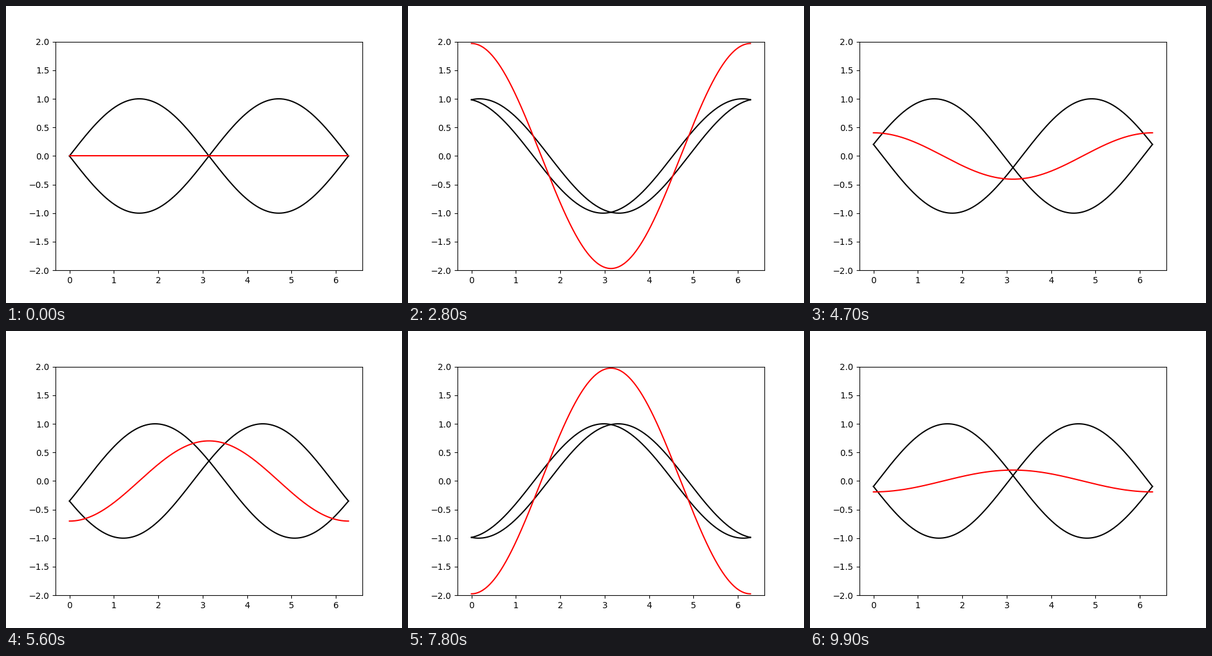
Recreate the animation shown at these times as a matplotlib script. Size 640 by 480 pixels, loop 10 s.

```python
import numpy as np
import matplotlib.pyplot as plt
from matplotlib.animation import FuncAnimation

FRAMES = 100
INTERVAL = 100
STEP = 1 / 16  # phase advance per frame, in radians

fig, ax = plt.subplots(figsize=(6.4, 4.8), dpi=100)
x = np.linspace(0, 2 * np.pi, 500)
right, = ax.plot(x, np.sin(x), color="black")
left, = ax.plot(x, -np.sin(x), color="black")
total, = ax.plot(x, np.zeros_like(x), color="red")
ax.set_ylim(-2, 2)


def update(frame):
    phase = STEP * frame
    a, b = np.sin(x + phase), np.sin(phase - x)
    right.set_ydata(a)
    left.set_ydata(b)
    total.set_ydata(a + b)
    return right, left, total


anim = FuncAnimation(fig, update, frames=FRAMES, interval=INTERVAL,
                     repeat=True, repeat_delay=0)
plt.show()
```
